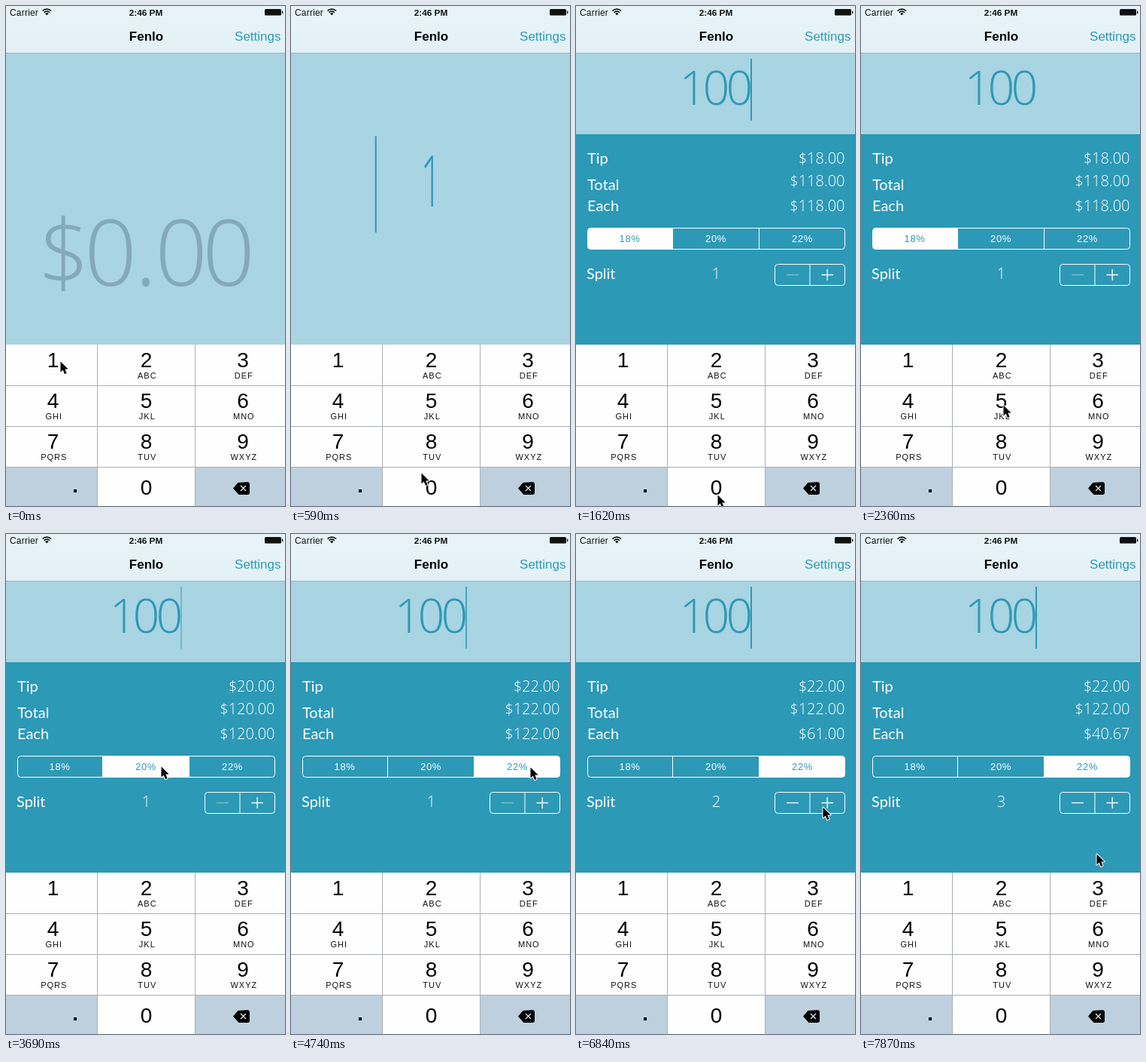
Recreate the animation shown at these times as an HTML page with a canvas. Size 371x663 px, loop 8000 ms.

```html
<!DOCTYPE html>
<html lang="en">
<head>
<meta charset="utf-8">
<title>Tip calculator</title>
<style>
  html, body { margin: 0; width: 100%; height: 100%; overflow: hidden; background: #a9d4e2; }
  canvas { display: block; }
</style>
</head>
<body>
<canvas id="stage" width="371" height="663"></canvas>
<script>
const ctx = document.getElementById('stage').getContext('2d');
const LOOP = 8000;
const PALE = '#a9d4e2', TEAL = '#2c99b7', GREY = '#bed0dd';
const SANS = '"Liberation Sans", Arial, sans-serif';
const LABEL = '20px Lato, sans-serif';
const FIGURE = '350 20px "Open Sans", sans-serif';
const big = size => `300 ${size}px "Open Sans", sans-serif`;

// Pointer stops: time, x, y
const PATH = [
  [0, 72, 471], [300, 72, 471], [590, 173, 619], [880, 188, 648],
  [1780, 188, 648], [2360, 189, 529], [2780, 206, 308], [3950, 206, 308],
  [4290, 318, 309], [5100, 318, 309], [5490, 329, 371], [5790, 328, 362],
  [7620, 328, 362], [7870, 313, 424], [8000, 313, 424]
];

const KEYS = [
  ['1', ''], ['2', 'ABC'], ['3', 'DEF'],
  ['4', 'GHI'], ['5', 'JKL'], ['6', 'MNO'],
  ['7', 'PQRS'], ['8', 'TUV'], ['9', 'WXYZ']
];

const clamp = x => Math.max(0, Math.min(1, x));
const ramp = (t, a, b) => clamp((t - a) / (b - a));
const smooth = x => x * x * (3 - 2 * x);
const mix = (a, b, p) => a + (b - a) * p;
const within = (t, a, b) => t >= a && t < b;
const money = v => '$' + v.toFixed(2);

function rect(x, y, w, h, color) {
  ctx.fillStyle = color;
  ctx.fillRect(x, y, w, h);
}

function text(str, x, y, font, color, align = 'left', spacing = 0) {
  ctx.font = font;
  ctx.fillStyle = color;
  ctx.textAlign = align;
  ctx.letterSpacing = spacing + 'px';
  ctx.fillText(str, x, y);
}

function line(points, color, width = 1) {
  ctx.beginPath();
  points.forEach(([x, y]) => ctx.lineTo(x, y));
  ctx.strokeStyle = color;
  ctx.lineWidth = width;
  ctx.stroke();
}

function box(x, y, w, h, r) {
  ctx.beginPath();
  ctx.roundRect(x, y, w, h, r);
}

function drawBars() {
  const g = ctx.createLinearGradient(0, 0, 0, 62);
  g.addColorStop(0, '#e7f3f9');
  g.addColorStop(1, '#e3f1f7');
  rect(0, 0, 371, 62, g);
  rect(0, 62, 371, 1, '#93b8c5');

  text('Carrier', 5, 12.5, '12px ' + SANS, '#111', 'left', 0.2);
  text('2:46 PM', 186, 12.5, 'bold 11.8px ' + SANS, '#111', 'center');
  for (const r of [9, 6]) {
    ctx.beginPath();
    ctx.arc(54.3, 12.3, r - 0.8, -Math.PI * 0.75, -Math.PI * 0.25);
    ctx.strokeStyle = '#111';
    ctx.lineWidth = 1.7;
    ctx.stroke();
  }
  ctx.fillStyle = '#111';
  ctx.beginPath();
  ctx.moveTo(54.3, 12.3);
  ctx.arc(54.3, 12.3, 3, -Math.PI * 0.75, -Math.PI * 0.25);
  ctx.fill();
  box(344, 4, 22, 8.5, 1.5);
  ctx.fill();
  rect(367, 6.5, 1.3, 3.5, '#111');

  text('Fenlo', 186.5, 46, 'bold 17px ' + SANS, '#050505', 'center');
  text('Settings', 365.5, 46, '17px ' + SANS, TEAL, 'right');
}

function drawKeys(t) {
  rect(0, 449, 371, 214, '#fefefe');
  rect(0, 611, 121, 52, GREY);
  rect(252, 611, 119, 52, GREY);
  if (within(t, 130, 330)) rect(0, 449, 121, 54, GREY);
  if (within(t, 950, 1150) || within(t, 1350, 1550)) rect(122, 612, 129, 51, GREY);

  const rule = '#abb0b4';
  for (const y of [503, 557, 611]) rect(0, y, 371, 1, rule);
  for (const x of [121, 251]) rect(x, 449, 1, 214, rule);

  const cols = [62.5, 186.5, 315];
  KEYS.forEach(([digit, letters], i) => {
    const x = cols[i % 3], y = 479 + 54 * Math.floor(i / 3);
    text(digit, x, y, '28px ' + SANS, '#000', 'center');
    text(letters, x + 1.3, y + 15, '11px ' + SANS, '#111', 'center', 1);
  });
  text('0', 186.5, 648, '28px ' + SANS, '#000', 'center');
  rect(90, 641, 4, 4, '#000');

  ctx.beginPath();
  ctx.moveTo(302, 639.5);
  ctx.lineTo(308.5, 632);
  ctx.arcTo(324, 631, 324, 635, 3);
  ctx.arcTo(324, 648, 320, 648, 3);
  ctx.lineTo(309.5, 648);
  ctx.closePath();
  ctx.fillStyle = '#000';
  ctx.fill();
  line([[312, 636], [319, 643]], '#e4edf2', 1.2);
  line([[319, 636], [312, 643]], '#e4edf2', 1.2);
}

function drawSegments(pick) {
  const edges = [15.5, 128.5, 243.5, 357.5];
  ctx.save();
  box(15.5, 294.5, 342, 28, 4);
  ctx.clip();
  rect(edges[pick], 294, edges[pick + 1] - edges[pick], 29, '#fff');
  ctx.restore();
  box(15.5, 294.5, 342, 28, 4);
  ctx.strokeStyle = '#fff';
  ctx.lineWidth = 1;
  ctx.stroke();
  [18, 20, 22].forEach((rate, i) => {
    if (i) line([[edges[i], 294], [edges[i], 323]], '#fff');
    text(rate + '%', [71.5, 186, 301][i], 313, '13px ' + SANS,
      i === pick ? TEAL : '#fff', 'center', 0.6);
  });
}

function drawStepper(split) {
  box(264.5, 342.5, 93, 28, 4);
  ctx.strokeStyle = '#fff';
  ctx.lineWidth = 1;
  ctx.stroke();
  line([[311, 342], [311, 371]], '#fff');
  line([[280, 356.5], [296, 356.5]], split > 1 ? '#fff' : '#83c0d2', 1.3);
  line([[326.5, 356.5], [342, 356.5]], '#fff', 1.4);
  line([[334.2, 349], [334.2, 364]], '#fff', 1.4);
}

function drawPanel(t, amount) {
  const pick = t < 3250 ? 0 : t < 4590 ? 1 : 2;
  const split = t < 6240 ? 1 : t < 7130 ? 2 : 3;
  const tip = amount * (18 + 2 * pick) / 100;
  const total = amount + tip;

  ctx.globalAlpha = smooth(ramp(t, 620, 860));
  rect(0, 170, 371, 279, TEAL);
  const rows = [['Tip', 209, 209, tip], ['Total', 244, 239, total], ['Each', 272, 272, total / split]];
  for (const [name, y, valueY, value] of rows) {
    text(name, 15, y, LABEL, '#fff');
    text(money(value), 357.5, valueY, FIGURE, '#fff', 'right');
  }
  text('Split', 14, 362, LABEL, '#fff');
  text(String(split), 186.5, 362, FIGURE, '#fff', 'center');
  drawSegments(pick);
  drawStepper(split);
  ctx.globalAlpha = 1;
}

function caretAlpha(t) {
  if (t < 2200) return 1;
  const phase = t % 1000;
  return 1 - ramp(phase, 200, 340) + ramp(phase, 610, 780);
}

function drawAmount(t, amount) {
  const str = String(amount);
  const left = 1 - smooth(ramp(t, 440, 780));
  const mid = 111 + 215 * left;

  ctx.save();
  ctx.translate(186.5, mid + 19.5 + 17 * left);
  ctx.scale(1 - 0.36 * left, 1 + 0.9 * left);
  [...str].forEach((c, i) => {
    text(c, 31 * (i - (str.length - 1) / 2), 0, big(62), TEAL, 'center');
  });
  ctx.restore();

  const x = mix(186.5 + 15.5 * str.length, 49, left);
  const h = 82 + 79 * left;
  ctx.globalAlpha = caretAlpha(t);
  rect(x - 1, mid - h / 2, 2, h, TEAL);
  ctx.globalAlpha = 1;
}

function drawPlaceholder() {
  const centers = [76.5, 139, 186, 233, 296];
  [...'$0.00'].forEach((c, i) => {
    text(c, centers[i], 370.5, big(122), '#84a9b9', 'center');
  });
}

function drawPointer(t) {
  const i = Math.max(1, PATH.findIndex(p => p[0] > t));
  const [t0, x0, y0] = PATH[i - 1], [t1, x1, y1] = PATH[i];
  const p = smooth(ramp(t, t0, t1));
  ctx.save();
  ctx.translate(mix(x0, x1, p), mix(y0, y1, p));
  ctx.beginPath();
  for (const [x, y] of [[0.5, 0.5], [0.5, 14.5], [3.7, 11.6], [6, 17],
    [8.6, 15.9], [6.3, 10.6], [10.6, 10.4]]) ctx.lineTo(x, y);
  ctx.closePath();
  ctx.lineJoin = 'round';
  ctx.strokeStyle = '#fff';
  ctx.lineWidth = 2;
  ctx.stroke();
  ctx.fillStyle = '#000';
  ctx.fill();
  ctx.restore();
}

function frame(now) {
  const t = now % LOOP;
  const amount = t < 1150 ? 1 : t < 1550 ? 10 : 100;
  rect(0, 0, 371, 663, PALE);
  if (t < 440) {
    drawPlaceholder();
  } else {
    drawPanel(t, amount);
    drawAmount(t, amount);
  }
  drawBars();
  drawKeys(t);
  drawPointer(t);
}

const start = performance.now();
function tick() {
  frame(performance.now() - start);
  requestAnimationFrame(tick);
}
tick();
</script>
</body>
</html>
```
